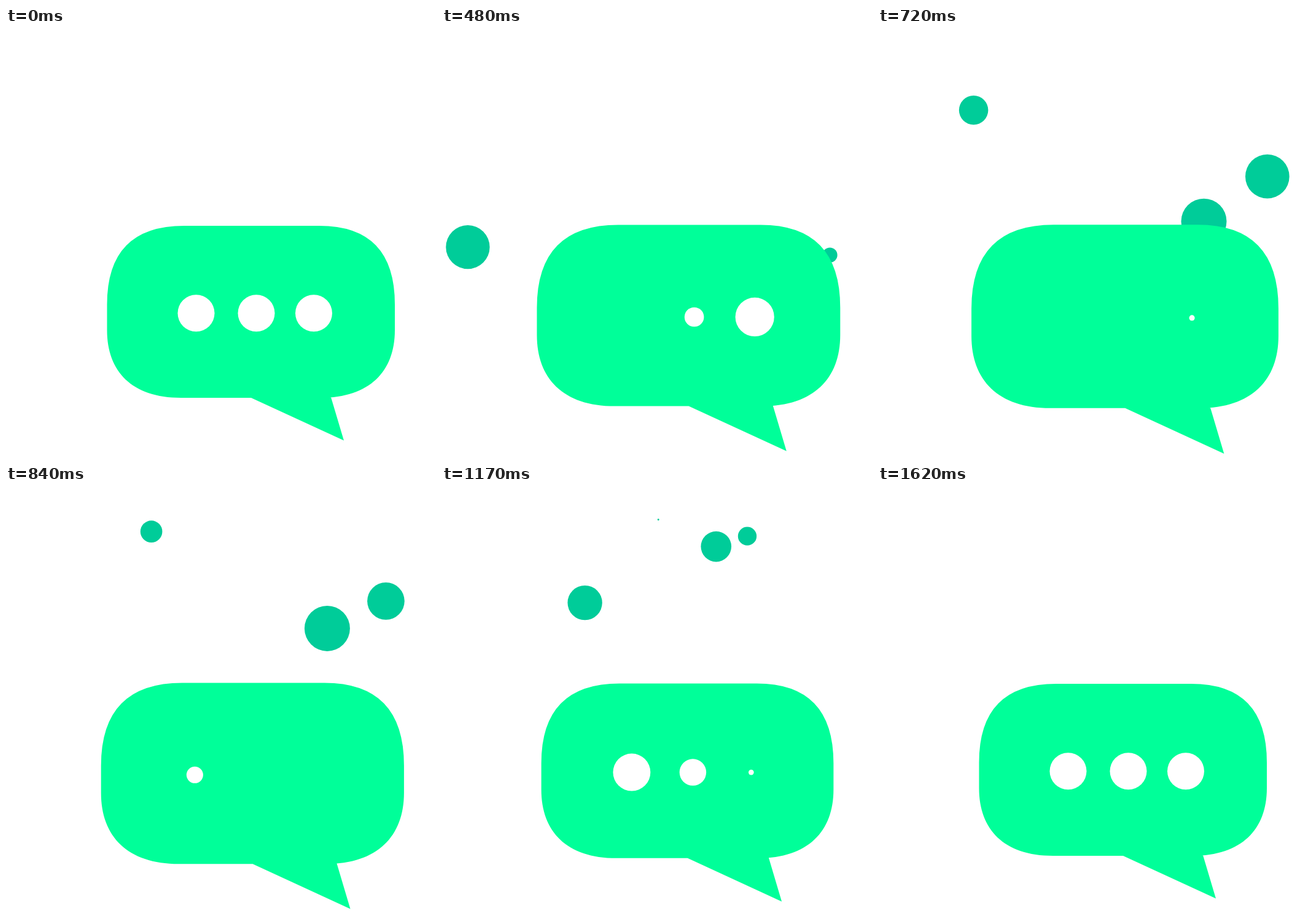
An HTML page with a canvas for the animation above (1650 ms loop, 700 by 700 pixels).

```html
<!DOCTYPE html>
<html lang="en">
<head>
<meta charset="utf-8">
<title>Typing bubble</title>
<style>
  html, body { margin: 0; width: 100%; height: 100%; overflow: hidden; background: #fff; }
  canvas { display: block; }
</style>
</head>
<body>
<canvas id="stage" width="700" height="700"></canvas>
<script>
const ctx = document.getElementById("stage").getContext("2d");
const LOOP = 1650, STEP = 30, CENTER = 350;
const GREEN = "#00ff99", TEAL = "#00cc99";
const DOT_TIME = 210, DOT_RADIUS = 30, BALL_RADIUS = 37;

const bubble = new Path2D(
  "M290 322H510Q633 322 633 450V492C633 559 592 602 512 602H285C205 602 164.5 559 164.5 492V450Q164.5 322 290 322Z" +
  "M399 602L512 595L529 601L550 671.5Z");

// Each dot shrinks away and grows back, starting at the given times.
const dots = [
  { x: 309.5, shrink: 210, grow: 750 },
  { x: 407.5, shrink: 375, grow: 1020 },
  { x: 501, shrink: 540, grow: 1140 }
];

const linear = u => u;
const easeOut = u => Math.sin(u * Math.PI / 2);

// Balls leave the bubble along a cubic Bezier; grow and fade set the radius slopes.
const balls = [
  { start: 210, life: 990, ease: easeOut, grow: 255, fade: 49, path: [[372, 424], [-217, 630], [115, -1], [353, 55]] },
  { start: 390, life: 1110, ease: linear, grow: 150, fade: 51, path: [[622, 423], [668, 199], [633, 31], [223, 57]] },
  { start: 540, life: 1050, ease: easeOut, grow: 255, fade: 62, path: [[501, 464], [573, 268], [506, 95], [382, 68]] },
  { start: 840, life: 690, ease: easeOut, grow: 255, fade: 54, path: [[300, 464], [234, 427], [143, 157], [350, 55]] }
];

const ramp = (t, start, length) => Math.min(1, Math.max(0, (t - start) / length));

function bezier(path, p) {
  const q = 1 - p, weights = [q * q * q, 3 * q * q * p, 3 * q * p * p, p * p * p];
  return [0, 1].map(axis => weights.reduce((sum, w, i) => sum + w * path[i][axis], 0));
}

function circle(x, y, r, color) {
  ctx.fillStyle = color;
  ctx.beginPath();
  ctx.arc(x, y, r, 0, 2 * Math.PI);
  ctx.fill();
}

function draw(t) {
  ctx.fillStyle = "#fff";
  ctx.fillRect(0, 0, 700, 700);

  for (const { start, life, ease, grow, fade, path } of balls) {
    const u = ramp(t, start, life);
    const [x, y] = bezier(path, ease(u));
    circle(x, y, Math.min(BALL_RADIUS, grow * u, fade * (1 - u)), TEAL);
  }

  const swell = t < 600 ? ramp(t, 240, 360) : (1 - ramp(t, 600, 720)) ** 1.06;
  const scale = 1 + 0.081 * swell;
  ctx.save();
  ctx.translate(CENTER, CENTER);
  ctx.scale(scale, scale);
  ctx.translate(-CENTER, -CENTER);
  ctx.fillStyle = GREEN;
  ctx.fill(bubble);
  for (const { x, shrink, grow } of dots) {
    const size = 1 - ramp(t, shrink, DOT_TIME) + ramp(t, grow, DOT_TIME);
    circle(x, 464.3, DOT_RADIUS * size, "#fff");
  }
  ctx.restore();
}

const begin = performance.now();
function tick() {
  const t = (performance.now() - begin) % LOOP;
  draw(Math.floor(t / STEP) * STEP);
  requestAnimationFrame(tick);
}
tick();
</script>
</body>
</html>
```
